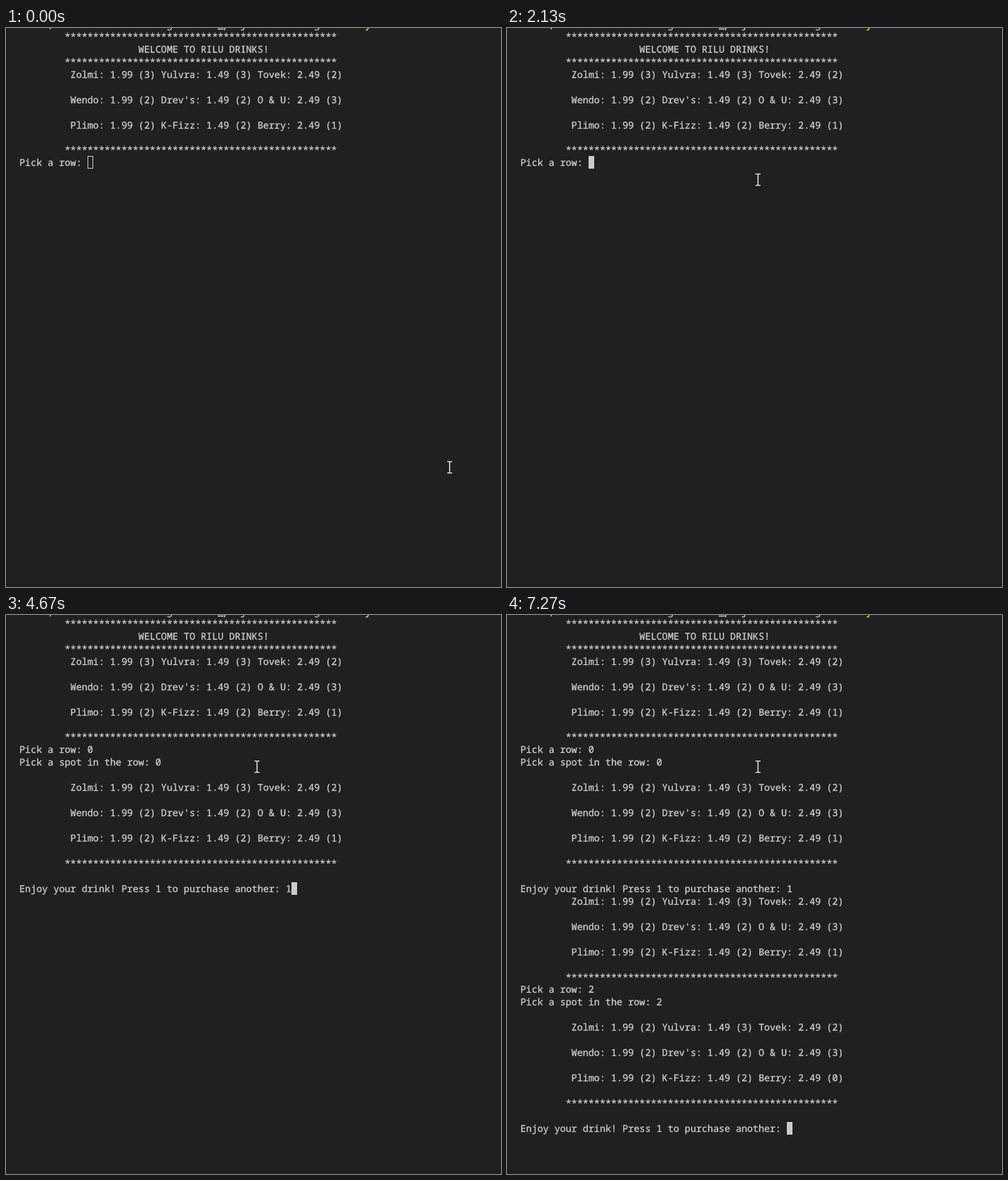
An HTML page for the animation above (8000 ms loop, 704 by 795 pixels).

```html
<!DOCTYPE html>
<html lang="en">
<head>
<meta charset="utf-8">
<title>Drink machine</title>
<style>
  html, body { margin: 0; width: 100%; height: 100%; overflow: hidden; background: #1e2021; }
  #stage {
    position: relative; width: 704px; height: 795px; overflow: hidden;
    background: linear-gradient(#1e2021 789px, #201e22 791px);
    color: #d0d0d0;
    font: 13.44px/18px "Noto Sans Mono", "DejaVu Sans Mono", monospace;
    font-variant-ligatures: none;
    text-rendering: geometricPrecision;
    -webkit-text-stroke: 0.3px;
  }
  .text { position: absolute; white-space: pre; }
  #caret {
    position: absolute; box-sizing: border-box; width: 8px; height: 18px;
    border: 1px solid #ccc;
  }
  #mouse { position: absolute; left: -5px; top: -10px; }
</style>
</head>
<body>
<div id="stage">
  <div id="caret"></div>
  <svg id="mouse" width="10" height="20" fill="none" stroke="#fff" stroke-width="1.3">
    <path d="M1.5 1.6H4L5 2.4L6 1.6H8.5M5 2.2V17.2M1.5 17.8H4L5 17L6 17.8H8.5"/>
  </svg>
</div>
<script>
const LOOP = 8000, TICK = 200 / 3;
const CELL = 8.064, LINE = 17.95, LEFT = 19, TOP = 20.85;
const stage = document.getElementById('stage');
const caret = document.getElementById('caret');
const mouse = document.getElementById('mouse');
const items = [];

const cellX = col => LEFT + col * CELL;
const cellY = row => Math.round(TOP + row * LINE);

function put(time, row, col, text, color) {
  const el = document.createElement('div');
  el.className = 'text';
  el.textContent = text;
  el.style.left = cellX(col) + 'px';
  el.style.top = cellY(row) + 'px';
  if (color) el.style.color = color;
  stage.insertBefore(el, caret);
  items.push({ time, el });
}

const stars = (time, row) => put(time, row, 8, '*'.repeat(48));

function menu(time, row, first, last) {
  put(time, row, 9, `Zolmi: 1.99 (${first}) Yulvra: 1.49 (3) Tovek: 2.49 (2)`);
  put(time, row + 2, 9, "Wendo: 1.99 (2) Drev's: 1.49 (2) O & U: 2.49 (3)");
  put(time, row + 4, 9, `Plimo: 1.99 (2) K-Fizz: 1.49 (2) Berry: 2.49 (${last})`);
  stars(time, row + 6);
}

const ROW = 'Pick a row: ';
const SPOT = 'Pick a spot in the row: ';
const AGAIN = 'Enjoy your drink! Press 1 to purchase another: ';

// Tail of the command line cut off by the top edge
const EDGE = -1.94;
put(0, EDGE, 5, ',');
put(0, EDGE, 26, 'g        _p  j            g');
put(0, EDGE, 61, 'y', '#f5f543');

stars(0, -1);
put(0, 0, 21, 'WELCOME TO RILU DRINKS!');
stars(0, 1);
menu(0, 2, 3, 1);
put(0, 9, 0, ROW);
put(2870, 9, 12, '0');
put(3070, 10, 0, SPOT);
put(3400, 10, 24, '0');
menu(3670, 12, 2, 1);
put(3670, 20, 0, AGAIN);
put(4670, 20, 47, '1');
menu(5130, 21, 2, 1);
put(5130, 28, 0, ROW);
put(5730, 28, 12, '2');
put(6530, 29, 0, SPOT);
put(7000, 29, 24, '2');
menu(7270, 31, 2, 0);
put(7270, 39, 0, AGAIN);

// Caret: time, row, column
const carets = [
  [0, 9, 12], [2870, 9, 13], [3070, 10, 24], [3400, 10, 25],
  [3670, 20, 47], [4670, 20, 48], [5130, 28, 12], [5730, 28, 13],
  [6470, 29, 0], [6530, 29, 24], [7000, 29, 25], [7270, 39, 47]
];
const FOCUS = 1730;

// Pointer moves: start, ticks, target x, target y
const start = [631, 625];
const moves = [
  [70, 7, 547, 476],
  [930, 6, 181, 251],
  [1470, 1, 157, 221],
  [1530, 1, 118, 188],
  [1730, 7, 357, 216]
];
const ease = p => p * p * (3 - 2 * p);

function pointer(t) {
  let [x, y] = start;
  for (const [at, ticks, tx, ty] of moves) {
    if (t < at) break;
    const step = Math.floor((t - at + 5) / TICK) + 1;
    const p = ease(Math.min(1, step / ticks));
    x += (tx - x) * p;
    y += (ty - y) * p;
  }
  return [x, y];
}

function draw(t) {
  for (const { time, el } of items) el.style.visibility = t >= time ? 'visible' : 'hidden';
  const [, row, col] = carets.filter(c => c[0] <= t).pop();
  caret.style.left = Math.round(cellX(col)) + 'px';
  caret.style.top = cellY(row) + 'px';
  caret.style.background = t >= FOCUS ? '#ccc' : 'none';
  const [x, y] = pointer(t);
  mouse.style.transform = `translate(${Math.round(x)}px, ${Math.round(y)}px)`;
}

const begin = performance.now();
function frame() {
  draw((performance.now() - begin) % LOOP);
  requestAnimationFrame(frame);
}
frame();
</script>
</body>
</html>
```
